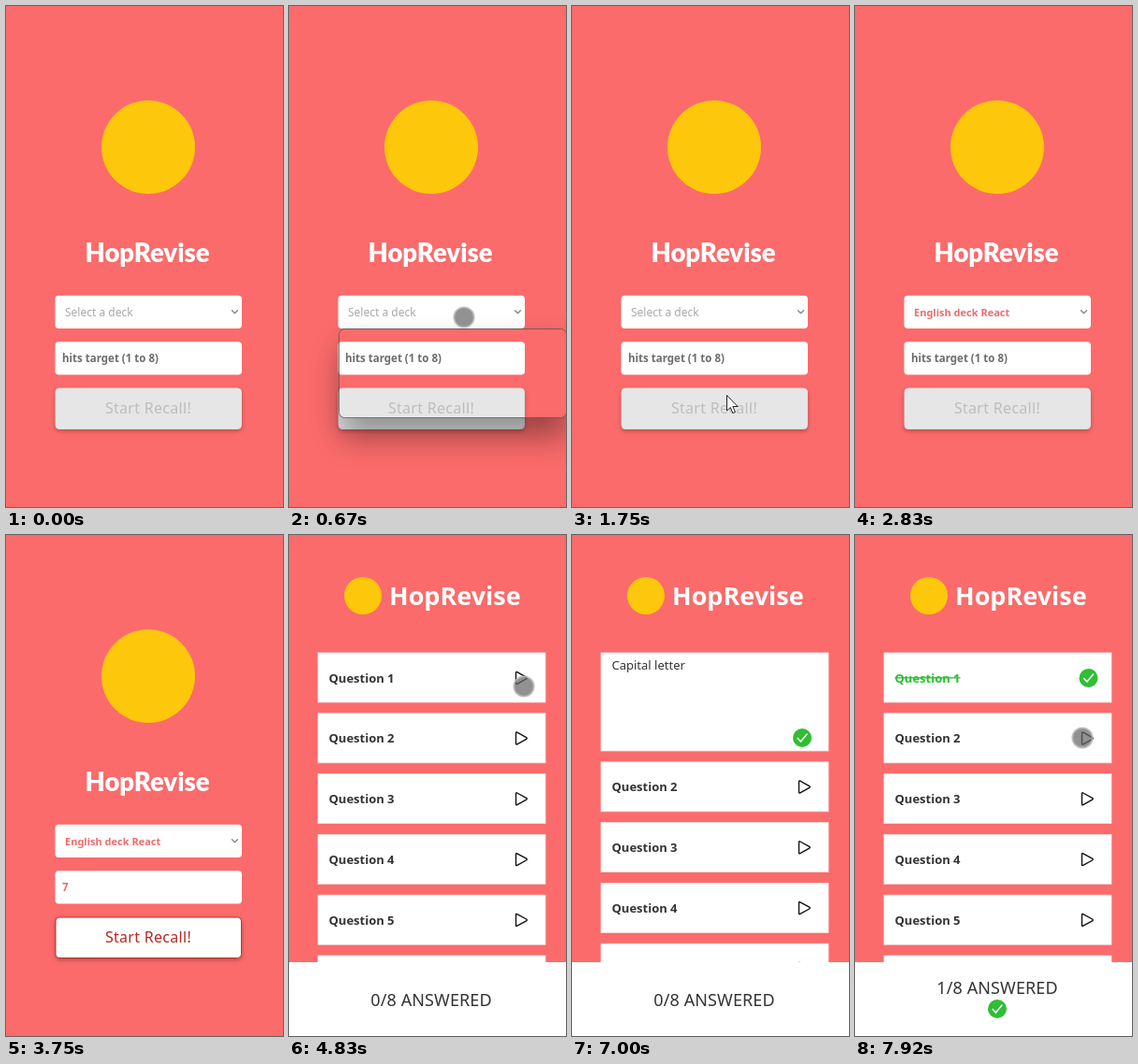
These frames come from a looping animation (296x536 px, 8000 ms). An HTML page:

```html
<!DOCTYPE html>
<html lang="en">
<head>
<meta charset="utf-8">
<title>HopRevise</title>
<style>
  html, body { margin: 0; width: 100%; height: 100%; overflow: hidden; background: #fb6b6b; }
  svg { display: block; width: 100%; height: 100%; }
  text { font: 13px "Noto Sans", "Open Sans", sans-serif; fill: #333; white-space: pre; }
  .bold { font-weight: 600; }
  .mid { text-anchor: middle; }
  .line { fill: none; stroke: #111; stroke-width: 1.4; stroke-linejoin: round; stroke-linecap: round; }
  .card { fill: #fff; stroke: #f3e3e3; stroke-width: .8; }
  #title { font: 900 27.5px Lato, sans-serif; fill: #fff; }
  #heading { font-size: 27px; font-weight: 700; fill: #fff; }
  #deck { font-size: 12px; fill: #a9a9a9; }
  #deck.on { font-size: 11px; font-weight: 700; fill: #ed6c6c; }
  #goal { font-size: 11.5px; font-weight: 700; fill: #6c6c6c; }
  #goal.on { fill: #ed6c6c; font-weight: 600; }
  #arrow { stroke: #888; }
  #button rect { fill: #e6e6e6; stroke: #dedede; filter: drop-shadow(0 2px 2px #0004); }
  #button text { font-size: 16px; letter-spacing: .3px; fill: #bdbdbd; }
  #button.on rect { fill: #fff; stroke: #b9332b; }
  #button.on text { fill: #b5281e; }
  #score { font-size: 18px; letter-spacing: .1px; }
  #done { fill: #2fbe34; text-decoration: line-through; }
</style>
</head>
<body>
<svg viewBox="0 0 296 536" preserveAspectRatio="none">
  <defs>
    <path id="play" class="line" d="M-5.5-5.6V5.6Q-5.5 7-4.2 6.3L5.6.9Q7 0 5.6-.9L-4.2-6.3Q-5.5-7-5.5-5.6Z"/>
    <g id="check">
      <circle r="10" fill="#2fbe34"/>
      <path d="M-4.8.4L-1.6 4 5-4" fill="none" stroke="#fff" stroke-width="1.5" stroke-linecap="round"/>
    </g>
    <mask id="outside" maskUnits="userSpaceOnUse" x="0" y="0" width="296" height="536">
      <rect width="296" height="536" fill="#fff"/>
      <rect x="53.5" y="345.5" width="243" height="95" rx="6"/>
    </mask>
    <filter id="blur" x="-40%" y="-80%" width="180%" height="260%"><feGaussianBlur stdDeviation="16"/></filter>
  </defs>

  <g id="start">
    <circle cx="152" cy="151" r="50" fill="#fdc70c"/>
    <text id="title" class="mid" x="151" y="274">HopRevise</text>
    <rect x="52.5" y="309.7" width="199.5" height="35.3" rx="4" fill="#fff"/>
    <text id="deck" x="63" y="332"></text>
    <path class="line" id="arrow" d="M241.5 325.7l3 3 3-3"/>
    <rect x="52.5" y="359.3" width="199.5" height="35.3" rx="4" fill="#fff"/>
    <text id="goal" x="60" y="381"></text>
    <g id="button">
      <rect x="53" y="409" width="198.5" height="43.5" rx="4"/>
      <text class="mid" x="152" y="436">Start Recall!</text>
    </g>
    <g id="popup">
      <g mask="url(#outside)">
        <rect x="55" y="364" width="243" height="98" rx="6" opacity=".36" filter="url(#blur)"/>
      </g>
      <rect x="53.5" y="345.5" width="243" height="95" rx="6" fill="none" stroke="#555" stroke-opacity=".75"/>
    </g>
  </g>

  <g id="quiz">
    <rect width="296" height="536" fill="#fb6b6b"/>
    <circle cx="79" cy="65" r="20" fill="#fdc70c"/>
    <text id="heading" x="107" y="75">HopRevise</text>
    <rect id="firstBox" class="card" x="31" y="126" width="243"/>
    <g id="closed">
      <text class="bold" x="42.5" y="157.5">Question 1</text>
      <use href="#play" x="248" y="153"/>
    </g>
    <g id="open">
      <text id="face" x="42.5" y="144"></text>
      <path id="turn" class="line" d="M256.5 210.5l6 5.5-6 5.5v-3.2c-4.6 0-7.2 1.3-9.2 4.7 0-6 3.2-9 9.2-9.4z"/>
      <use id="yes" href="#check" x="246" y="217"/>
    </g>
    <g id="solved">
      <text id="done" class="bold" x="42.5" y="157.5">Question 1</text>
      <use href="#check" x="249.5" y="153"/>
    </g>
    <g id="rest"></g>
    <rect y="457" width="296" height="79" fill="#fff"/>
    <text id="score" class="mid" x="152"></text>
    <use id="tick" href="#check" x="152" y="507"/>
  </g>

  <circle id="touch" r="10.7" fill="#666" fill-opacity=".72" stroke="#bbb" stroke-opacity=".85" stroke-width="1.8"/>
  <path id="pointer" d="M0 0V16.5L3.8 13 6.4 19 9 17.9 6.4 12H11.6Z" fill="#fff" stroke="#222" stroke-width="1"/>
</svg>
<script>
const $ = id => document.getElementById(id);
const show = (id, on) => { $(id).style.display = on ? "" : "none"; };
const place = (id, x, y) => $(id).setAttribute("transform", `translate(${x} ${y})`);
const ramp = (t, a, b) => Math.min(1, Math.max(0, (t - a) / (b - a)));

$("rest").innerHTML = [2, 3, 4, 5, 6].map(n => {
  const y = 126 + (n - 1) * 64.8;
  return `<rect class="card" x="31" y="${y}" width="243" height="53"/>
    <text class="bold" x="42.5" y="${y + 31.5}">Question ${n}</text>
    <use href="#play" x="248" y="${y + 26.7}"/>`;
}).join("");

// from, to, x, y
const touches = [
  [500, 920, 187, 333], [2420, 2830, 152, 378], [3000, 3170, 172, 391],
  [3830, 4170, 173.5, 428], [4830, 5000, 251, 162], [5170, 5580, 259, 156.5],
  [5580, 6080, 261, 153], [6330, 6420, 255.5, 200.5], [6670, 7000, 256.5, 220],
  [7500, 8000, 243, 217]
];

function draw(t) {
  const within = (a, b) => t >= a && t < b;
  const picked = t >= 2000, typed = t >= 3170, quiz = t >= 3920;
  const open = within(5750, 7750), answer = t >= 6830, solved = t >= 7750;

  show("start", !quiz);
  $("deck").textContent = picked ? "English deck React" : "Select a deck";
  $("deck").classList.toggle("on", picked);
  $("goal").textContent = typed ? "7" : "hits target (1 to 8)";
  $("goal").classList.toggle("on", typed);
  $("button").classList.toggle("on", typed);
  show("popup", within(540, 1750));
  $("popup").style.opacity = ramp(t, 540, 670);

  show("quiz", quiz);
  show("closed", !open && !solved);
  show("open", open);
  show("solved", solved);
  show("turn", !answer);
  show("yes", answer);
  $("face").textContent = answer ? "Capital letter" : "Components should start with";
  $("firstBox").setAttribute("height", open ? 105 : 53);
  place("rest", 0, open ? 52 : 0);
  $("score").textContent = (solved ? 1 : 0) + "/8 ANSWERED";
  $("score").setAttribute("y", solved ? 491 : 504);
  show("tick", solved);

  const hit = touches.find(([a, b]) => within(a, b));
  show("touch", hit);
  if (hit) place("touch", hit[2], hit[3]);
  const k = ramp(t, 920, 1670), ease = k * k * (3 - 2 * k);
  show("pointer", within(920, 2000));
  place("pointer", 187 - 21.5 * ease, 333 + 83.5 * ease);
}

const begin = performance.now();
function tick() {
  draw((performance.now() - begin) % 8000);
  requestAnimationFrame(tick);
}
tick();
</script>
</body>
</html>
```
